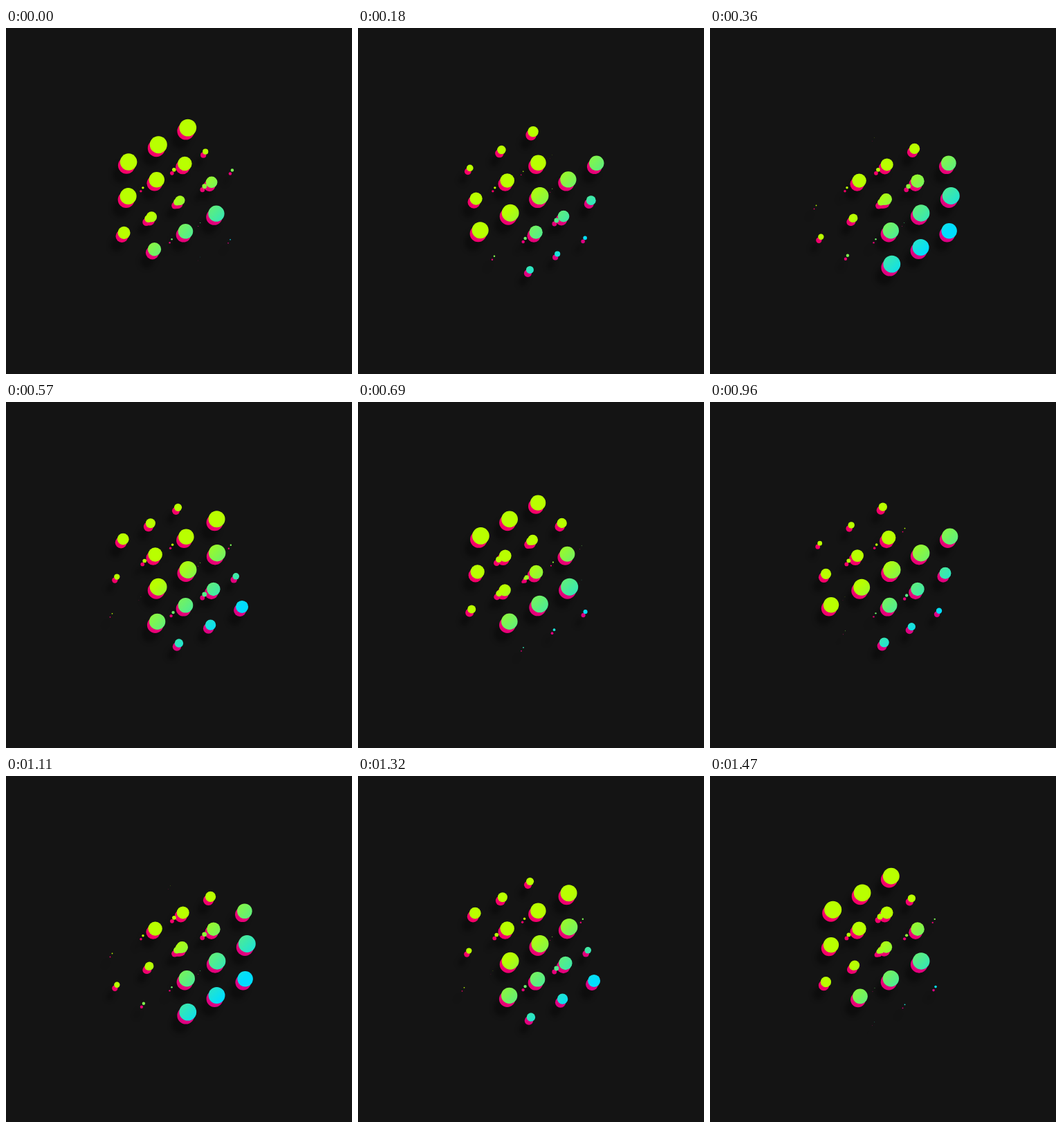
Write an HTML page with a canvas that moves like this. It is 500 px wide and 500 px high and loops after 1500 ms.

```html
<!DOCTYPE html>
<html lang="en">
<head>
<meta charset="utf-8">
<title>Pulsing lattice</title>
<style>
  html, body { margin: 0; width: 100%; height: 100%; overflow: hidden; background: #141414; }
  canvas { display: block; filter: drop-shadow(-8px 13px 3px rgba(0, 0, 0, .35)); }
</style>
</head>
<body>
<canvas id="stage" width="500" height="500"></canvas>
<script>
const ctx = document.getElementById('stage').getContext('2d');

const PERIOD = 750, STEP = 30;
const UNIT = 49.25, TRAVEL = 30, RADIUS = 12.5;
const COS = Math.cos(Math.PI / 6), SIN = 0.5;
const STEPS = [-1, 0, 1];

function gradient(from, to, start, end) {
  const g = ctx.createLinearGradient(from, from, to, to);
  g.addColorStop(0, start);
  g.addColorStop(1, end);
  return g;
}

const lime = gradient(240, 318, '#b9ff00', '#00ddff');
const pink = gradient(220, 320, '#f5006a', '#dc0084');

// 3 x 3 x 3 cube in isometric view; each dot lags the previous one by 1/27 turn
const dots = [];
for (const k of STEPS) for (const j of STEPS) for (const i of STEPS) {
  dots.push({
    x: 250 + (i - k) * COS * UNIT,
    y: 250 + (j - (i + k) * SIN) * UNIT,
    lag: (dots.length + 1) / 27
  });
}

function paint(list, fill, dx, dy) {
  ctx.fillStyle = fill;
  for (const d of list) {
    ctx.beginPath();
    ctx.arc(d.x + dx, d.y + dy, d.r, 0, 2 * Math.PI);
    ctx.fill();
  }
}

function draw(ms) {
  const turn = (ms % PERIOD) / PERIOD;
  const posed = dots.map(d => {
    const wave = Math.sin(2 * Math.PI * (turn - d.lag));
    const shift = wave * TRAVEL / 2;
    return {
      x: d.x + shift * COS,
      y: d.y - shift * SIN,
      r: RADIUS * (1 + wave) / 2
    };
  });
  ctx.clearRect(0, 0, 500, 500);
  paint(posed, pink, -3, 5);
  paint(posed, lime, 0, 0);
}

const start = performance.now();
function tick() {
  const ms = performance.now() - start;
  draw(Math.floor(ms / STEP) * STEP);
  requestAnimationFrame(tick);
}
tick();
</script>
</body>
</html>
```
